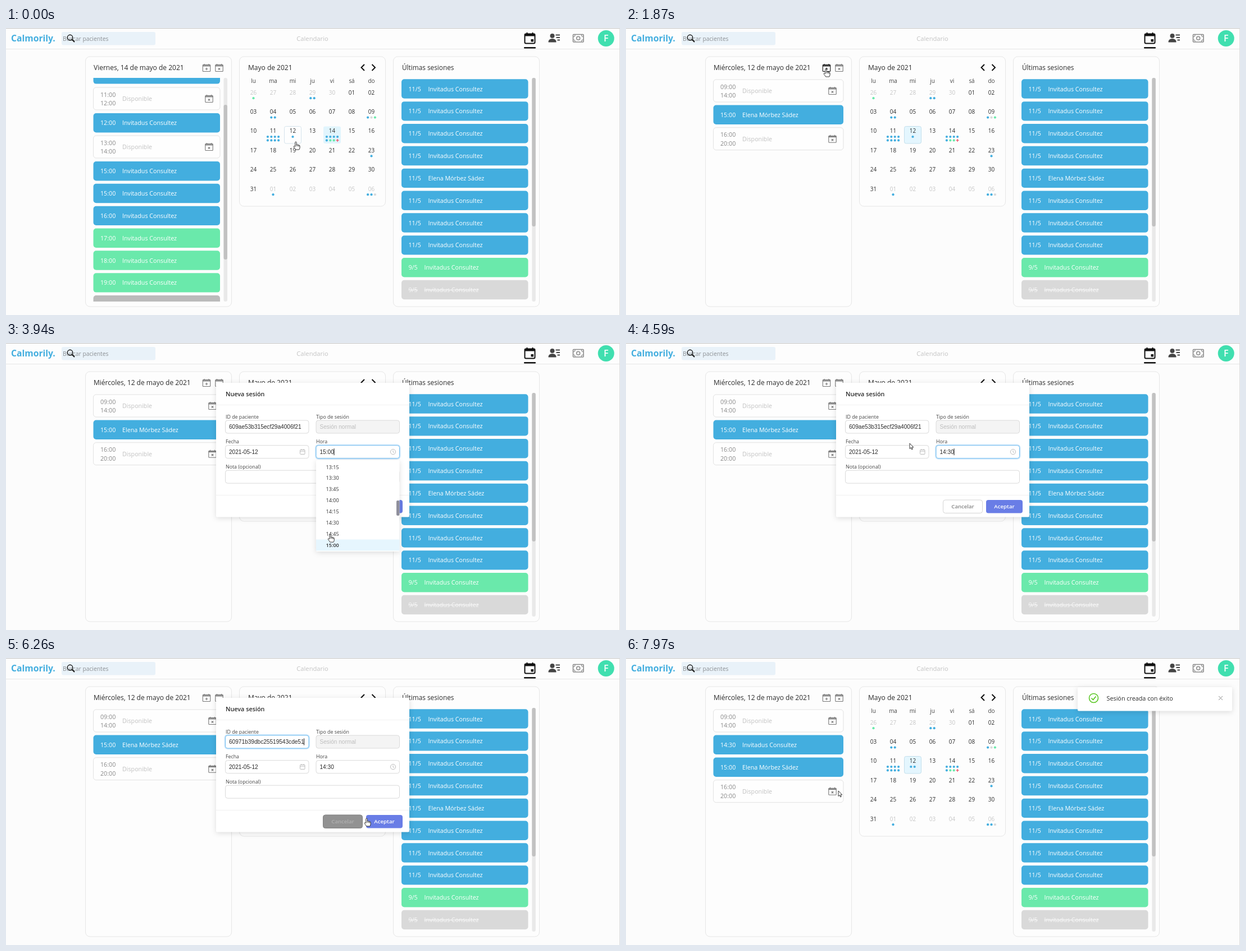
These frames come from a looping animation (1093 by 512 pixels, 8000 ms). An HTML page:

```html
<!DOCTYPE html>
<html lang="es">
<head>
<meta charset="utf-8">
<title>Calendario</title>
<style>
html, body { margin: 0; width: 100%; height: 100%; overflow: hidden; background: #fcfcfc; }
svg { display: block; width: 100%; height: 100%; }
text { font-family: "Open Sans", "Noto Sans", sans-serif; white-space: pre; }
.field { font-family: "Liberation Sans", Arial, sans-serif; }
.shadow { filter: drop-shadow(0 2px 5px rgba(0,0,0,.13)); }
</style>
</head>
<body>
<svg viewBox="0 0 1093 512">
  <g id="base"></g><g id="day"></g><g id="month"></g>
  <g id="modal"></g><g id="toast"></g><g id="cursor"></g>
</svg>
<script>
const LOOP = 8000;
const BLUE = '#43aedf', GREEN = '#6ae9ab', GREY = '#d9d9d9', INK = '#2b2b2b';
const PATIENT = 'Invitadus Consultez', OTHER = 'Elena Mórbez Sádez';

const clamp = v => Math.max(0, Math.min(1, v));
const ramp = (t, a, b) => clamp((t - a) / (b - a));
const smooth = k => k * k * (3 - 2 * k);
const easeOut = k => 1 - (1 - k) ** 3;

// y is the vertical centre of the capitals
const text = (x, y, s, size = 10.7, fill = INK, more = '') =>
  `<text x="${x}" y="${y + size * .357}" font-size="${size}" fill="${fill}" ${more}>${s}</text>`;
const rect = (x, y, w, h, r, fill, more = '') =>
  `<rect x="${x}" y="${y}" width="${w}" height="${h}" rx="${r}" fill="${fill}" ${more}/>`;
const path = (d, stroke, width = 1, more = 'fill="none"') =>
  `<path d="${d}" stroke="${stroke}" stroke-width="${width}" ${more}/>`;
const circle = (x, y, r, fill, more = '') =>
  `<circle cx="${x}" cy="${y}" r="${r}" fill="${fill}" ${more}/>`;
const group = (attrs, body) => `<g ${attrs}>${body}</g>`;
const at = (x, y, body) => group(`transform="translate(${x} ${y})"`, body);
const card = (x, h) => rect(x, 51, 260, h, 8, '#fdfdfd', 'stroke="#e6e6e6"');
const scrollbar = (x, y, h) =>
  rect(x, 89, 6.5, 399, 3, '#e9e9e9') + rect(x, y, 6.5, h, 3, '#c2c2c2');

const PLUS = 'M-2.3 2H2.3M0-.3V4.3', CROSS = 'M-1.7.3L1.7 3.7M1.7.3L-1.7 3.7';
const calIcon = (x, y, sign, color = '#777') => at(x, y,
  rect(-6.7, -5.5, 13.4, 12, 1, 'none', `stroke="${color}" stroke-width="1.1"`) +
  path('M-6.7-3.6H6.7', color, 2) + path('M-4-7V-5M4-7V-5', color, 1.3) + path(sign, color, 1.2));

function booking(x, y, w, when, name, fill, ink = '#fff', more = '') {
  const gap = when.length * 5.5 + (when.length > 4 ? 12 : 13);
  const nameX = x + 12.5 + (when.length == 3 ? 28 : when.length == 4 ? 35 : 39) + gap * 0;
  return rect(x, y, w, 34.4, 5, fill) +
    text(x + 12.5, y + 17.4, when, 10.7, ink, 'font-weight="500" ' + more) +
    text(nameX, y + 17.4, name, 10.7, ink, 'font-weight="500" ' + more);
}

const slot = (y, w, from, to) =>
  rect(155.5, y, w, 40, 5, '#fefefe', 'stroke="#e2e2e2"') +
  text(168, y + 12.8, from, 10.7, '#888') + text(168, y + 28.2, to, 10.7, '#888') +
  text(207, y + 20.3, 'Disponible', 10.7, '#c2c2c2') +
  calIcon(155.5 + w - 19.5, y + 20, CROSS);

function header() {
  return rect(0, 0, 1093, 37, 0, '#fdfdfd') +
    path('M0 37.5H1093', '#e6e6e6') + path('M0 .5H1093', '#c4c4c4') + path('M1092.5 0V512', '#dcdcdc') +
    text(9, 18, 'Calmorily.', 15.7, BLUE, 'font-weight="700"') +
    rect(99, 7, 167, 23.5, 3, '#e9f2f9') +
    text(101, 19, 'Buscar pacientes', 10.3, '#8b8f93') +
    circle(114, 17, 4.7, 'none', 'stroke="#111" stroke-width="1.4"') + path('M117.5 20.5L122 25', '#111', 1.8) +
    text(545.5, 19, 'Calendario', 11.2, '#c4c4c4', 'text-anchor="middle"') +
    rect(923.5, 10.5, 18, 17, 2, 'none', 'stroke="#111" stroke-width="2"') +
    path('M923 12.5H942', '#111', 4) + path('M927.5 8V12M937.5 8V12', '#111', 2) +
    rect(934.5, 20, 4.5, 4.5, 0, '#111') + rect(922, 34, 21, 2.6, 1, '#111') +
    circle(972.5, 14, 4, '#444') + path('M965.5 25.5q0-6.5 7-6.5t7 6.5z', 'none', 0, 'fill="#444"') +
    path('M978.5 12.5H986M979.5 17H986M981.5 21.5H986', '#444', 1.8) +
    rect(1009.5, 11.5, 18.5, 13.5, 1, 'none', 'stroke="#8a8a8a" stroke-width="1.6"') +
    circle(1018.7, 18.2, 3, 'none', 'stroke="#8a8a8a" stroke-width="1.5"') +
    path('M1010 15.5q3 0 3-3.5M1027.500 15.500q-3 0-3-3.500M1010 21q3 0 3 3.500M1027.500 21q-3 0-3 3.500', '#8a8a8a', 1.2) +
    circle(1068.2, 18.5, 14.5, '#40dfaf') +
    text(1068.2, 18.7, 'F', 16, '#fff', 'text-anchor="middle" font-weight="600"');
}

function sessions() {
  let s = card(689.5, 446) + text(705, 71, 'Últimas sesiones', 11.8) + scrollbar(936.3, 89, 265);
  for (let i = 0; i < 10; i++) {
    const y = 91.3 + i * 39.84;
    s += i < 8 ? booking(704, y, 225.5, '11/5', i == 4 ? OTHER : PATIENT, BLUE)
      : i < 9 ? booking(704, y, 225.5, '9/5', PATIENT, GREEN)
      : booking(704, y, 225.5, '9/5', PATIENT, GREY, '#f8f8f8', 'text-decoration="line-through"');
  }
  return s;
}

function day(t) {
  const friday = t < 670, created = t >= 6820, hover = t > 1780 && t < 2300;
  let s = card(141.5, 446) +
    text(156, 71, friday ? 'Viernes, 14 de mayo de 2021' : 'Miércoles, 12 de mayo de 2021', 12) +
    calIcon(357, 71, PLUS, hover ? '#111' : '#777') + calIcon(379.5, 71, CROSS);
  if (!friday) {
    const w = 231.5, shift = created ? 40 : 0;
    return s + slot(92, w, '09:00', '14:00') +
      (created ? booking(155.5, 137.6, w, '14:30', PATIENT, BLUE) : '') +
      booking(155.5, 137.6 + shift, w, '15:00', OTHER, BLUE) +
      slot(177.7 + shift, w, '16:00', '20:00');
  }
  const w = 225.5, hours = ['15:00', '15:00', '16:00', '17:00', '18:00', '19:00', '20:00'];
  const list = rect(155.5, 65.2, w, 34.4, 5, BLUE) + slot(106, w, '11:00', '12:00') +
    booking(155.5, 152, w, '12:00', PATIENT, BLUE) + slot(192, w, '13:00', '14:00') +
    hours.map((h, i) => booking(155.5, 238 + i * 39.84, w, h, PATIENT,
      i < 3 ? BLUE : i < 6 ? GREEN : '#bbb')).join('');
  return s + '<clipPath id="view"><path d="M150 89H390V488H150Z"/></clipPath>' +
    group('clip-path="url(#view)"', list) + scrollbar(387.5, 137, 276);
}

const MARKS = { 0: 'g', 3: 'bb', 8: 'bb', 13: 'bxg', 15: 'bbbbbbbb', 16: 'b', 18: 'bbbbbggr', 27: 'b', 36: 'b', 41: 'bbx' };
const DOT = { b: BLUE, g: GREEN, x: GREY };

const dots = (x, y, marks) => (marks.match(/.{1,4}/g) || []).map((line, row) =>
  [...line].map((m, i) => {
    const dx = x + (i - (line.length - 1) / 2) * 6.4, dy = y + row * 6.4;
    return m == 'r' ? path(`M${dx - 2.5} ${dy}h5M${dx} ${dy - 2.5}v5`, '#f0526a', 1.4)
      : circle(dx, dy, 2.1, DOT[m]);
  }).join('')).join('');

function month(t) {
  let s = card(415.5, 267) + text(431, 71, 'Mayo de 2021', 12) +
    path('M638 65L632.500 70.500L638 76M651.500 65L657 70.500L651.500 76', '#111', 2);
  s += t < 670
    ? rect(565, 175.500, 31, 30.500, 3, '#e1f5fd') + rect(495.500, 175.500, 30, 30.500, 3, '#fefefe', 'stroke="#d5e3ec"')
    : rect(495.500, 175.500, 30, 30.500, 3, '#e4f6fe', 'stroke="#c3dfec"');
  ['lu', 'ma', 'mi', 'ju', 'vi', 'sá', 'do'].forEach((d, i) =>
    s += text(440.5 + i * 35, 94.5, d, 9.9, '#444', 'text-anchor="middle"'));
  for (let i = 0; i < 42; i++) {
    const x = 440.5 + i % 7 * 35, y = 115 + Math.floor(i / 7) * 34.4;
    const n = i < 5 ? 26 + i : i < 36 ? i - 4 : i - 35;
    s += text(x, y, String(n).padStart(2, '0'), 9.9, i < 5 || i > 35 ? '#c6c6c6' : INK, 'text-anchor="middle"') +
      dots(x, y + 10.2, i == 16 && t >= 6820 ? 'bb' : MARKS[i] || '');
  }
  return s;
}

const input = (x, y, w, value, focus, disabled) =>
  (focus ? rect(x - 1, y - 1, w + 2, 25, 5, 'none', 'stroke="#cfe8fb" stroke-width="2"') : '') +
  rect(x, y, w, 23, 4, disabled ? '#f4f4f4' : '#fff', `stroke="${focus ? '#6fbcf0' : '#dadada'}"`) +
  text(x + 6.5, y + 11.5, value, 10.1, disabled ? '#bdbdbd' : INK, 'class="field"');
const caret = (x, y) => path(`M${x} ${y - 6}V${y + 6}`, '#111');

function dropdown(alpha) {
  let s = rect(552, 209, 148.500, 163, 2, '#fff', 'class="shadow"') + rect(552, 350.500, 148.500, 20, 0, '#e6f6fe');
  for (let i = 0; i < 8; i++) {
    const q = 53 + i;
    s += text(569.5, 221.3 + i * 19.88, Math.floor(q / 4) + ':' + String(q % 4 * 15).padStart(2, '0'),
      9.1, '#333', i == 7 ? 'font-weight="600"' : '');
  }
  return group(`opacity="${alpha}"`, s + rect(695, 281, 5.500, 27, 2, '#8f8f9c'));
}

function modal(t) {
  if (t < 2150 || t > 6850) return '';
  const open = easeOut(ramp(t, 2150, 2400)), alpha = open * (1 - ramp(t, 6680, 6850));
  const scale = .2 + .8 * open;
  const onHour = t > 2880 && t < 5100, onId = t >= 5100;
  const selected = t >= 5150 && t < 5420, pasted = t >= 5420;
  const list = ramp(t, 2950, 3150) * (1 - ramp(t, 4370, 4550));
  const cancel = ramp(t, 6050, 6160) * (1 - ramp(t, 6250, 6400));
  const id = pasted ? '60971b39dbc25519543cde51' : '609ae53b315ecf29a4006f21';
  const label = (x, y, s) => text(x, y, s, 8.8, '#444');
  let s = rect(374, 71, 344, 239.5, 2, '#fff', 'class="shadow"') +
    text(391, 91.5, 'Nueva sesión', 10.8, INK, 'font-weight="600"') +
    path('M374 110.500H718M374 271.500H718', '#f1f1f1') +
    label(391, 131.5, 'ID de paciente') + label(552, 131.5, 'Tipo de sesión') +
    label(391, 176, 'Fecha') + label(552, 176, 'Hora') + label(391, 220.5, 'Nota (opcional)') +
    input(390.5, 138, 148.5, id, onId) + input(552, 138, 148.5, 'Sesión normal', false, true) +
    input(390.5, 182.7, 148.5, '2021-05-12') + input(552, 182.7, 148.5, t < 4350 ? '15:00' : '14:30', onHour) +
    input(390.5, 227.2, 310, '') +
    (selected ? rect(396.5, 143, 129, 13, 0, '#1a82e2') + text(397, 149.5, id, 10.1, '#fff', 'class="field"') : '') +
    (pasted ? caret(530.5, 149.5) : '') + (onHour ? caret(584, 194.2) : '') +
    rect(523.5, 190.5, 8.5, 8, 1, 'none', 'stroke="#bbb"') + path('M523.500 193H532M525.500 189V191M530 189V191', '#bbb') +
    circle(689, 194.2, 4.6, 'none', 'stroke="#bbb"') + path('M689 191.500V194.500L691 195.500', '#bbb') +
    rect(564.5, 280, 70, 23.5, 4, '#fff', 'stroke="#d4d4d4"') +
    text(599.5, 291.7, 'Cancelar', 9.6, '#858585', 'text-anchor="middle" font-weight="600"');
  if (cancel) s += group(`opacity="${cancel}"`, rect(564.5, 280, 70, 23.5, 4, '#8a8a8a', 'stroke="#7a7a7a"') +
    text(599.5, 291.7, 'Cancelar', 9.6, '#b4b4b4', 'text-anchor="middle" font-weight="600"'));
  s += rect(641, 280, 65, 23.5, 4, '#697de6') +
    text(673.5, 291.7, 'Aceptar', 9.7, '#fff', 'text-anchor="middle" font-weight="600"');
  if (list) s += dropdown(list);
  return group(`opacity="${alpha}" transform="translate(357 76) scale(${scale}) translate(-357 -76)"`, s);
}

function toast(t) {
  if (t < 6800) return '';
  const x = 290 * (1 - easeOut(ramp(t, 6800, 7090)));
  return at(x, 0, rect(804, 52, 275, 42.5, 2, '#fff', 'class="shadow"') +
    circle(832.5, 71.5, 8, 'none', 'stroke="#52c41a" stroke-width="1.5"') +
    path('M828.500 71.500L831.500 74.500L836.500 68.500', '#52c41a', 1.6) +
    text(855.5, 72.3, 'Sesión creada con éxito', 10.8) +
    path('M1055 68L1062 75M1062 68L1055 75', '#8c8c8c'));
}

// time, x, y of the pointer tip
const TRACK = [
  [0, 516, 203], [120, 516, 203], [270, 516, 191], [1060, 516, 191], [1870, 356, 73], [2130, 356, 73],
  [2850, 592, 191], [3300, 592, 191], [3750, 576, 372], [4090, 578, 320], [4350, 578, 320], [4590, 505, 179],
  [5050, 465, 144], [5500, 465, 144], [6260, 642, 286], [6410, 660, 291], [6680, 660, 291],
  [6950, 621, 297], [7610, 424, 262], [7730, 424, 262], [7970, 378, 237], [LOOP, 378, 237]
];
const KINDS = [[0, 'hand'], [1150, 'arrow'], [1780, 'hand'], [2170, 'arrow'], [2750, 'beam'], [3380, 'hand'],
  [4400, 'arrow'], [4980, 'beam'], [5600, 'arrow'], [6000, 'hand'], [7560, 'arrow']];
const SHAPES = {
  hand: path('M-1.300 8V1.200q0-1.200 1.200-1.200t1.200 1.200V5q2-.7 2.400.5 1.800-.5 2 .6 1.600-.2 1.600 1.300V10q0 2-1.300 4H-.5Q-1.500 12-3.600 9.500q-.8-1.200.2-1.800 1-.3 2.100 1.100zM1.100 5V8M3.500 5.500V8.200M5.500 6.200V8.500',
    '#222', .9, 'fill="#fff" stroke-linejoin="round"'),
  arrow: path('M0 0V9.600L2.200 7.600L3.700 11L5.300 10.300L3.800 7H6.800Z', '#222', .9, 'fill="#fff" stroke-linejoin="round"'),
  beam: path('M-2.500.5H-.8L0 1L.8.5H2.500M0 1V11.500M-2.500 12H-.8L0 11.500L.8 12H2.500', '#222')
};

function cursor(t) {
  const i = TRACK.findIndex(k => k[0] > t);
  const [t0, x0, y0] = TRACK[i - 1], [t1, x1, y1] = TRACK[i];
  const k = smooth(ramp(t, t0, t1));
  const kind = KINDS.filter(e => e[0] <= t).pop()[1];
  return at(x0 + (x1 - x0) * k, y0 + (y1 - y0) * k, SHAPES[kind]);
}

const drawn = {};
function show(id, markup) {
  if (drawn[id] !== markup) document.getElementById(id).innerHTML = drawn[id] = markup;
}

show('base', header() + sessions());
const layers = { day, month, modal, toast, cursor };
const start = performance.now();
function frame() {
  const t = (performance.now() - start) % LOOP;
  for (const id in layers) show(id, layers[id](t));
  requestAnimationFrame(frame);
}
frame();
</script>
</body>
</html>
```
